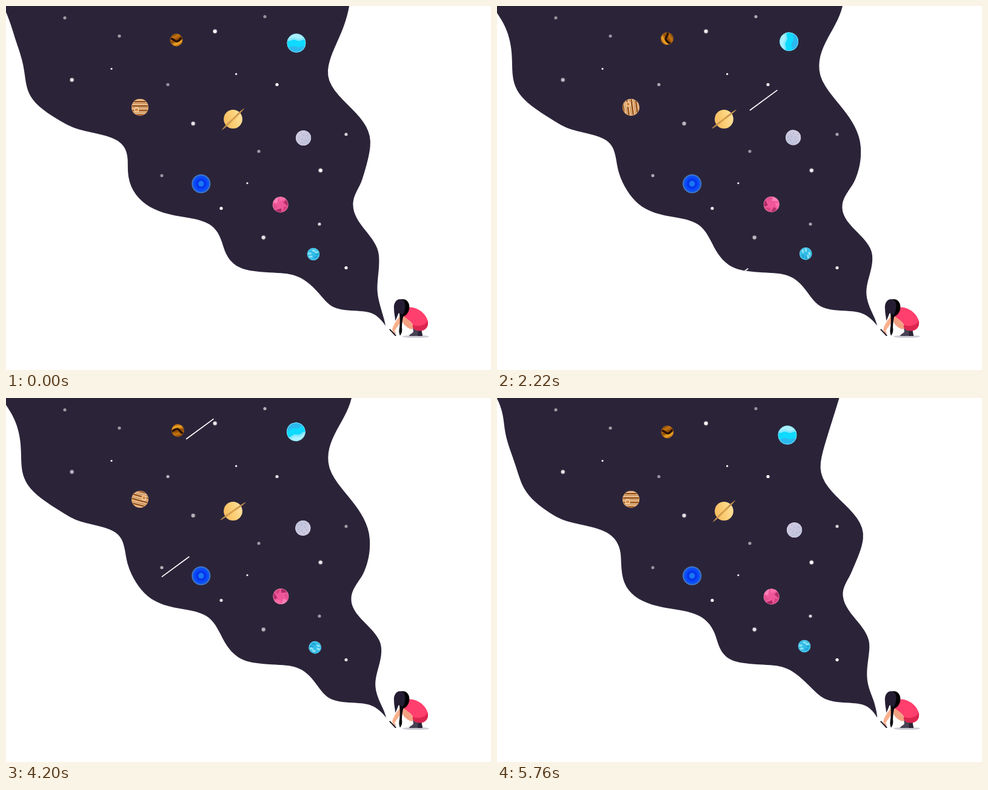
Animation, 800 px wide and 600 px high, one loop 5790 ms. Source, as an HTML page with a canvas:

```html
<!DOCTYPE html>
<html>
<head>
<meta charset="utf-8">
<style>
  html, body { margin: 0; width: 100%; height: 100%; overflow: hidden; background: #fff; }
  canvas { display: block; }
</style>
</head>
<body>
<canvas id="stage" width="800" height="600"></canvas>
<script>
const ctx = document.getElementById('stage').getContext('2d');
const TAU = Math.PI * 2;
const LOOP = 5790, STEP = 30, WAVE = 990, SPIN = 2880, TWINKLE = 1920, METEOR = 1440;

// Key points of the sky's edges, top to tip: x, y, heading in degrees.
const LEFT = smooth(.47, [
  [-6, -4, 58], [21, 78, 80], [80, 182, 35], [150, 211, 13], [201.5, 262, 82], [285, 347, 9],
  [360.5, 397, 67], [428, 438.7, 4], [508, 468, 48], [563, 501.5, 5], [627.5, 527, 55]]);
const RIGHT = smooth(.34, [
  [571, -15, 100], [533.5, 106, 90], [602.3, 232, 90], [588, 286, 114], [569.5, 327, 90],
  [617, 411, 90], [609.6, 465, 90], [627.5, 527, 82]]);
const OUTLINE = LEFT.concat(RIGHT.reverse());

// Samples a cubic curve through the key points; reach is the handle length per chord.
function smooth(reach, nodes) {
  const points = [];
  for (let i = 1; i < nodes.length; i++) {
    const [x0, y0, a0] = nodes[i - 1], [x3, y3, a3] = nodes[i];
    const h = reach * Math.hypot(x3 - x0, y3 - y0), rad = TAU / 360;
    const x1 = x0 + h * Math.cos(a0 * rad), y1 = y0 + h * Math.sin(a0 * rad);
    const x2 = x3 - h * Math.cos(a3 * rad), y2 = y3 - h * Math.sin(a3 * rad);
    for (let u = 0; u <= 1; u += 1 / 16) {
      const v = 1 - u;
      const mix = (a, b, c, d) => v * v * v * a + 3 * v * v * u * b + 3 * v * u * u * c + u * u * u * d;
      points.push([mix(x0, x1, x2, x3), mix(y0, y1, y2, y3)]);
    }
  }
  return points;
}

// A slow ripple runs up the edges and fades out at the tip.
function skyPath(t) {
  const path = new Path2D();
  for (const [x, y] of OUTLINE) {
    const phase = t / WAVE - .72 + y / 141 + x * .0007;
    const amp = (3.8 - x / 650) * Math.min(1, (560 - y) / 60);
    path.lineTo(x + amp * Math.cos(TAU * phase), y);
  }
  path.closePath();
  return path;
}

function disc(x, y, r, color) {
  ctx.fillStyle = color;
  ctx.beginPath();
  ctx.arc(x, y, r, 0, TAU);
  ctx.fill();
}

function oval(x, y, rx, ry, color) {
  ctx.fillStyle = color;
  ctx.beginPath();
  ctx.ellipse(x, y, rx, ry, 0, 0, TAU);
  ctx.fill();
}

function shape(color, d) {
  ctx.fillStyle = color;
  ctx.fill(new Path2D(d));
}

function line(color, width, x1, y1, x2, y2) {
  ctx.strokeStyle = color;
  ctx.lineWidth = width;
  ctx.beginPath();
  ctx.moveTo(x1, y1);
  ctx.lineTo(x2, y2);
  ctx.stroke();
}

function ramp(x1, y1, x2, y2, ...colors) {
  const g = ctx.createLinearGradient(x1, y1, x2, y2);
  colors.forEach((c, i) => g.addColorStop(i / (colors.length - 1), c));
  return g;
}

function drawStars(t) {
  const stars = (phase, halo, ...places) => {
    const glow = .75 + .25 * Math.cos(TAU * (t / TWINKLE - phase));
    for (const [x, y] of places) {
      ctx.globalAlpha = glow;
      disc(x, y, halo ? 2.8 : 2.6, '#fff');
      ctx.globalAlpha = glow * .4;
      if (halo) disc(x, y, 3.8, '#fff');
    }
    ctx.globalAlpha = 1;
  };
  stars(0, false, [447, 129.5], [355, 333.5], [561, 431.5]);
  stars(.5, false, [427, 17.5], [267, 129.5], [257, 279.5]);
  stars(.6, false, [97, 19.5], [187, 49.5], [417, 239.5]);
  stars(.78, false, [561, 211.5], [517, 359.5]);
  stars(0, true, [344.7, 41.8], [518.8, 271]);
  stars(.8, true, [108.7, 121.8], [308.7, 193.8], [424.7, 381.6]);
  for (const [x, y] of [[174, 103.5], [379.7, 112.2], [398, 292]]) disc(x, y, 1.6, '#fff');
}

function drawMeteors(t) {
  const meteor = (x0, speed, height, dt) => {
    const x = x0 - speed * dt, y = height - .767 * x;
    line('#fff', 1.7, x - 22.7, y + 16.7, x + 22.7, y - 16.7);
  };
  for (let pass = 1; pass <= 3; pass++) {
    const dt = t - pass * METEOR;
    meteor(283.5, .303, 296.4, dt);
    meteor(244, .2965, 492.6, dt);
    meteor(632.9, .3095, 749.7, dt);
  }
}

function bluePlanet(r) {
  const band = (y, color) => {
    ctx.fillStyle = color;
    ctx.beginPath();
    ctx.moveTo(-r, r);
    for (let x = -r; x <= r; x++) ctx.lineTo(x, y + Math.sin(x / 2.6));
    ctx.lineTo(r, r);
    ctx.fill();
  };
  disc(0, 0, r, '#a9f0ff');
  band(-8, '#83e8ff');
  band(-4.5, '#0fdaff');
  band(6, '#2cb9ee');
}

function goldPlanet(r) {
  disc(0, 0, r, ramp(-5, -10, 5, 10, '#6b3407', '#c9780f', '#8a4608', '#f2a826', '#a85c0a'));
  ctx.strokeStyle = '#2b1306';
  ctx.lineWidth = 3.6;
  ctx.stroke(new Path2D('M-11 -2C-4 -4 -3 4 2 2C6 1 7 -4 11 -5'));
}

function stripedPlanet(r) {
  const colors = ['#d98f48', '#fbe3c3', '#c9752a', '#8a4a1a', '#f3cb9a'];
  for (let i = 0; i < 20; i++) {
    ctx.fillStyle = colors[i % 5];
    ctx.fillRect(-r, 1.45 * i - r, 2 * r, 1.6);
  }
  disc(-5.7, 4, 4, '#fbe0ba');
  disc(-5.7, 4, 2.8, '#d98b45');
}

function moon(r) {
  disc(0, 0, r, ramp(-9, -9, 9, 9, '#d3cbe0', '#c6c6de', '#bfc3dc'));
  for (let i = 1; i < 9; i++)
    disc(3.4 * Math.sqrt(i) * Math.cos(i * 2.4), 3.4 * Math.sqrt(i) * Math.sin(i * 2.4), .9, '#a9abd0');
}

function pinkPlanet(r) {
  disc(0, 0, r, '#f0579a');
  const colors = ['#b52f6b', '#d8437f', '#a92a62', '#e0508f', '#ff80b6', '#ff6ca9'];
  colors.forEach((color, i) => {
    const a = i * TAU / 6 - .7, b = a + TAU / 6;
    ctx.fillStyle = color;
    ctx.beginPath();
    ctx.moveTo(6 * Math.cos(a), 6 * Math.sin(a));
    ctx.lineTo(16 * Math.cos(a), 16 * Math.sin(a));
    ctx.lineTo(16 * Math.cos(b), 16 * Math.sin(b));
    ctx.fill();
  });
}

function smallPlanet(r) {
  disc(0, 0, r, '#33bce8');
  for (let i = 0; i < 6; i++)
    oval(6 * Math.cos(i * 2.4), 6 * Math.sin(i * 2.4), 3, 1.8, i % 3 ? '#8be2f3' : '#1fa6d8');
}

function drawPlanets(t) {
  // Each disc sits a little off its pivot (dx, dy), so it wobbles as it spins.
  const spin = (paint, rim, r, x, y, dir, dx, dy) => {
    ctx.save();
    ctx.translate(x, y);
    ctx.rotate(dir * TAU * t / SPIN);
    ctx.translate(dx, dy);
    ctx.beginPath();
    ctx.arc(0, 0, r, 0, TAU);
    ctx.clip();
    paint(r);
    ctx.strokeStyle = rim;
    ctx.lineWidth = 1.4;
    ctx.beginPath();
    ctx.arc(0, 0, r, 0, TAU);
    ctx.stroke();
    ctx.restore();
  };
  spin(bluePlanet, '#7fdcf4', 15.4, 479, 58.4, 1, 0, 2.6);
  spin(goldPlanet, '#a8641a', 10.4, 282, 54.6, -1, -1, 1.4);
  spin(stripedPlanet, '#d9a36c', 13.9, 221, 167, -1, 0, 0);
  spin(moon, '#d8d4e6', 12.6, 490, 216, -1, .6, 1.5);
  spin(pinkPlanet, '#e583ad', 12.9, 453, 327.2, -1, -.3, .3);
  spin(smallPlanet, '#6cd3ee', 10.3, 508.5, 409.9, -1, -1.5, -.9);
}

function drawCorePlanet() {
  const colors = ['#4a7fc9', '#1459e6', '#0a48fb', '#0536ea', '#1a78f0'];
  colors.forEach((color, i) => disc(321.8, 293, 15.5 - 1.1 * i - .4 * i * i, color));
}

function drawRingedPlanet(t) {
  ctx.save();
  ctx.translate(374.5, 186.5);
  disc(0, 0, 15.4, ramp(-14, 4, 14, -4, '#f5bd62', '#fccf76', '#ffe09a'));
  ctx.rotate((-29.5 - 14.5 * Math.cos(TAU * t / TWINKLE)) * Math.PI / 180);
  oval(0, 0, 25.6, 1.6, ramp(-25, 0, 25, 0, '#bb8a4c', '#c9944c', '#dda650', '#c9944c', '#bb8a4c'));
  ctx.restore();
}

function drawGirl() {
  oval(676, 544.8, 22, 2.3, '#cfcdd6');
  shape('#474153', 'M671 530L685 532L687 543.8L665 544C665 541 670 540 672 537Z');
  shape('#2b2436', 'M680 534L685 533L687 543.8L679 544Z');
  shape('#f2a181', 'M656 511C661 514 670 522 673 530L669 533C662 531 656 526 654 520Z');
  shape('#ff3f6d', 'M661 497C677 494 694 507 696 521C697 531 690 536 681 535C673 535 670 530 671 525C667 519 661 515 655 511Z');
  shape('#db2650', 'M671 526C680 529 692 527 695.8 518C698 530 690 536 681 535.5C674 535 670 531 671 526Z');
  shape('#f9b08d', 'M655 510L657 515C651 521 646 528 642 534L639 538L637 534C638 527 644 518 650 511Z');
  shape('#f2a181', 'M640 536L643 538L641 542L638 540Z');
  shape('#000', 'M652 483.5C661 482 667 490 665 500C663 508 658 511 655 512L649 500Z');
  shape('#251e33', 'M652 483.5C644 482 639 490 640 499C640 507 642 512 642 519C645 514 646 509 648 506L653 512C657 505 661 496 657 487C656 485 654 484 652 483.5Z');
  shape('#0b0810', 'M649 507L656 509C654 516 653 524 653 530C654 535 653 540 650 543.5C648 539 648 535 649 530C650 522 650 515 649 507Z');
  ctx.lineCap = 'round';
  line('#1b1622', 2, 633.3, 533.4, 642.5, 543);
  ctx.lineCap = 'butt';
}

function draw(t) {
  ctx.fillStyle = '#fff';
  ctx.fillRect(0, 0, 800, 600);
  const sky = skyPath(t);
  ctx.fillStyle = '#2b2439';
  ctx.fill(sky);
  ctx.save();
  ctx.clip(sky);
  drawStars(t);
  drawMeteors(t);
  ctx.restore();
  drawPlanets(t);
  drawCorePlanet();
  drawRingedPlanet(t);
  drawGirl();
}

const start = performance.now();
function tick() {
  const t = (performance.now() - start) % LOOP;
  draw(Math.floor(t / STEP) * STEP);
  requestAnimationFrame(tick);
}
tick();
</script>
</body>
</html>
```
